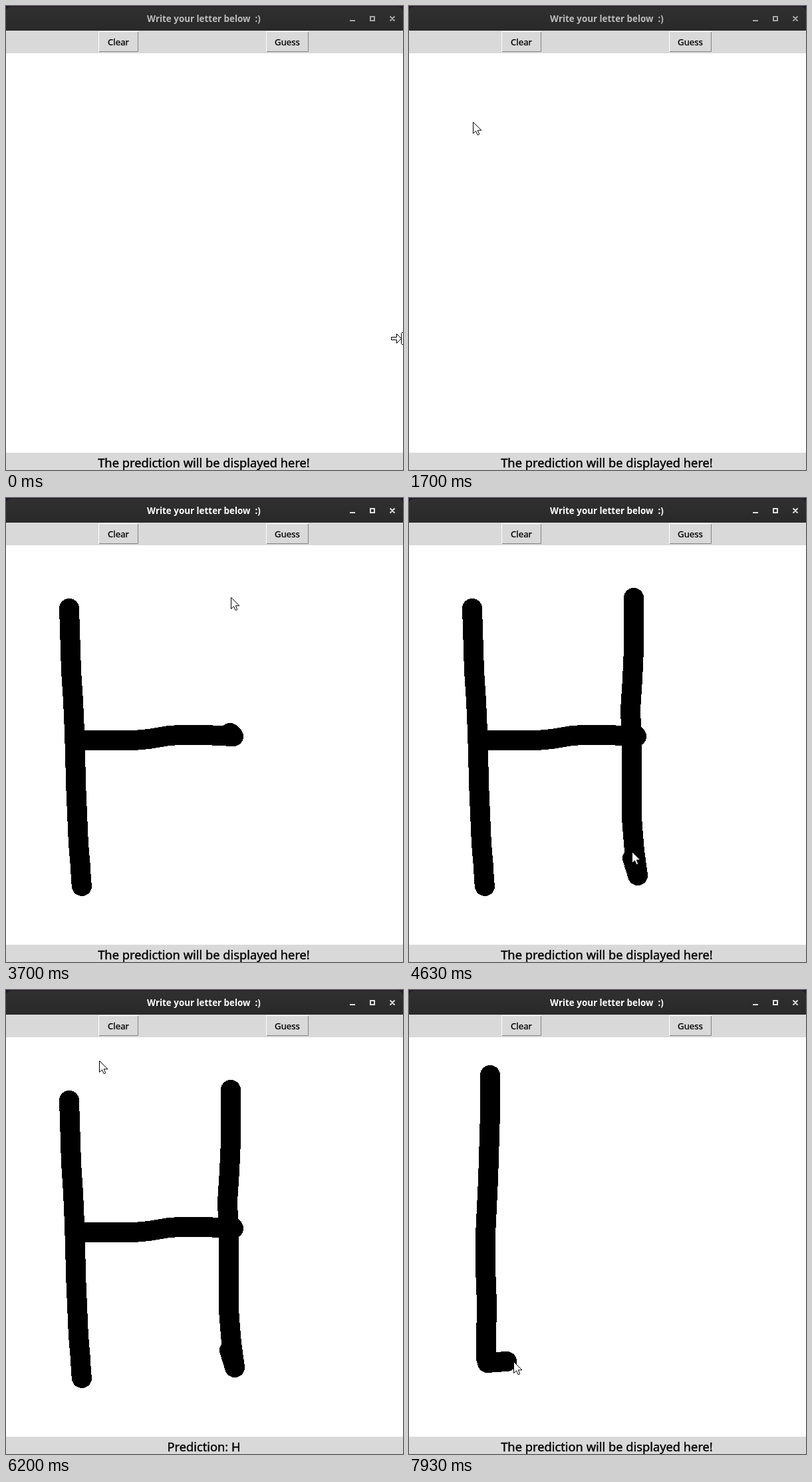
An HTML page that plays this animation: 597 px wide and 697 px high, repeating every 8 s.

```html
<!DOCTYPE html>
<html lang="en">
<head>
<meta charset="utf-8">
<title>Letter pad</title>
<style>
  html, body { margin: 0; width: 100%; height: 100%; overflow: hidden; background: #fff; }
  svg { display: block; width: 597px; height: 697px; }
  text { font-family: "Noto Sans", "Open Sans", sans-serif; text-anchor: middle; white-space: pre; font-weight: 500; }
  #frame { --ink: #bcbcbc; }
  #frame.focused { --ink: #fff; }
  #frame text { font-size: 13.4px; font-weight: 600; fill: var(--ink); }
  #frame path { fill: none; stroke: var(--ink); stroke-width: 2; opacity: .85; }
  .button text { font-size: 13.2px; stroke: #000; stroke-width: .3; }
  .button rect { fill: #d9d9d9; }
  .button.hover rect { fill: #ececec; }
  .light { stroke: #fff; fill: none; }
  .dark { stroke: #828282; fill: none; }
  .pressed .light { stroke: #828282; }
  .pressed .dark { stroke: #fff; }
  #label { font-size: 18.3px; stroke: #000; stroke-width: .4; }
  #ink path { fill: none; stroke: #000; stroke-width: 30; stroke-linecap: round; stroke-linejoin: round; shape-rendering: crispEdges; }
  #arrow, #edge { fill: #fff; stroke: #000; }
</style>
</head>
<body>
<svg viewBox="0 0 597 697">
  <defs>
    <linearGradient id="bar" x2="0" y2="1">
      <stop stop-color="#303030"/><stop offset="1" stop-color="#292929"/>
    </linearGradient>
  </defs>
  <rect width="597" height="697" fill="#fff"/>
  <rect width="597" height="37" fill="#21152b"/>
  <path d="M0 37V9Q0 1 8 1H589Q597 1 597 9V37Z" fill="url(#bar)"/>
  <g id="frame">
    <text x="297.5" y="24">Write your letter below  :)</text>
    <path d="M517 22H525M548 16H554V22H548ZM577.5 15.5L584.5 22.5M584.5 15.5L577.5 22.5"/>
  </g>
  <rect y="37" width="597" height="34" fill="#d9d9d9"/>
  <g id="clear" class="button">
    <rect x="139" y="38" width="60" height="31"/>
    <path class="light" d="M139.5 69V38.5H199"/><path class="dark" d="M140 68.5H198.5V39"/>
    <text x="169" y="59">Clear</text>
  </g>
  <g id="guess" class="button">
    <rect x="391" y="38" width="64" height="31"/>
    <path class="light" d="M391.5 69V38.5H455"/><path class="dark" d="M392 68.5H454.5V39"/>
    <text x="423" y="59">Guess</text>
  </g>
  <g id="ink"></g>
  <rect y="671" width="597" height="26" fill="#d9d9d9"/>
  <text id="label" x="297.5" y="693"></text>
  <path id="edge" d="M579.5 497.5H587.5V492.5L594.5 499.5L587.5 506.5V501.5H579.5ZM598 490.5H595.5L594.5 491.5V507.5L595.5 508.5H598"/>
  <path id="arrow" d="M.5 .5V17.5L4.5 13.8L7.2 19.8L9.8 18.7L7.3 12.8H13Z"/>
</svg>
<script>
const LOOP = 8000, FOCUS = 1800, GUESSED = 5350, CLEARED = 6550;
const byId = id => document.getElementById(id);

// Each leg starts where the previous one ended.
const legs = [];
let last = [580, 499], clock = 30;
function leg(end, pen, ...coords) {
  const points = [last];
  for (let i = 0; i < coords.length; i += 2) points.push([coords[i], coords[i + 1]]);
  legs.push({ start: clock, end, pen, points });
  last = points[points.length - 1];
  clock = end;
}
const move = (end, ...coords) => leg(end, false, ...coords);
const draw = (end, ...coords) => leg(end, true, ...coords);

move(650, 390, 410, 160, 265, 76, 206);
move(730, 81, 185);
move(830, 93, 161);
move(970, 95, 163);
move(1330, 106, 236);
move(1800, 95, 166);
draw(2300, 98, 260, 101, 305, 103, 350, 105.5, 440, 109, 520, 112, 554);
draw(2400, 113, 575, 114, 583);
move(2600, 116, 378);
move(2720, 118, 313);
move(2850, 113, 364);
draw(3350, 193, 364, 215, 362, 245, 357, 262, 356, 300, 356, 342, 358);
draw(3430, 337, 353);
move(3690, 338, 149);
move(3780, 338, 150);
draw(4300, 338, 228, 336, 272, 333, 318, 335, 372, 335, 480, 336.5, 500);
draw(4480, 339, 530, 344, 567);
draw(4590, 336, 541);
move(4630, 335, 531);
move(5030, 416, 62);
move(5200, 424, 55);
move(5550, 420, 57);
move(6000, 210, 92);
move(6200, 140, 106);
move(6400, 158, 56);
move(6560, 160, 55);
move(6800, 138, 116);
move(6950, 82, 128);
move(7080, 122, 128);
draw(7630, 122, 185, 119, 285, 115, 368, 115, 418, 117, 470);
draw(7810, 116, 530, 116, 553, 118, 560);
draw(7920, 131, 559, 147, 558);
move(7930, 157, 558);

const distance = (a, b) => Math.hypot(b[0] - a[0], b[1] - a[1]);

// The part of a leg covered at time t, as a list of points.
function covered({ start, end, pen, points }, t) {
  let p = Math.min(1, Math.max(0, (t - start) / (end - start)));
  if (!pen) p = p * p * (3 - 2 * p);
  let left = p * points.slice(1).reduce((sum, b, i) => sum + distance(points[i], b), 0);
  const trail = [points[0]];
  for (let i = 1; i < points.length; i++) {
    const a = points[i - 1], b = points[i], size = distance(a, b);
    const k = Math.min(1, left / size);
    trail.push([a[0] + (b[0] - a[0]) * k, a[1] + (b[1] - a[1]) * k]);
    left -= size;
    if (left <= 0) break;
  }
  return trail;
}

for (const item of legs.filter(l => l.pen)) {
  item.node = document.createElementNS("http://www.w3.org/2000/svg", "path");
  byId("ink").append(item.node);
}

function updateButton(id, x, y, left, right, pressed) {
  const classes = byId(id).classList;
  classes.toggle("hover", x >= left && x < right && y >= 38 && y < 69);
  classes.toggle("pressed", pressed);
}

function render(t) {
  const current = legs.find(l => t < l.end) || legs[legs.length - 1];
  const [x, y] = covered(current, t).pop().map(Math.round);
  const atEdge = t < 50;
  byId("edge").style.display = atEdge ? "" : "none";
  byId("arrow").style.display = atEdge ? "none" : "";
  byId("arrow").setAttribute("transform", `translate(${x} ${y})`);

  for (const item of legs) {
    if (!item.node) continue;
    const shown = t > item.start && (t < CLEARED || item.start > CLEARED);
    item.node.setAttribute("d", shown ? "M" + covered(item, t).join("L") : "");
  }

  byId("frame").classList.toggle("focused", t >= FOCUS);
  updateButton("clear", x, y, 139, 199, t >= CLEARED - 90 && t < CLEARED);
  updateButton("guess", x, y, 391, 455, t >= GUESSED - 90 && t < GUESSED);
  byId("label").textContent = t >= GUESSED && t < CLEARED
    ? "Prediction: H" : "The prediction will be displayed here!";
}

const begin = performance.now();
function tick() {
  render((performance.now() - begin) % LOOP);
  requestAnimationFrame(tick);
}
tick();
</script>
</body>
</html>
```
